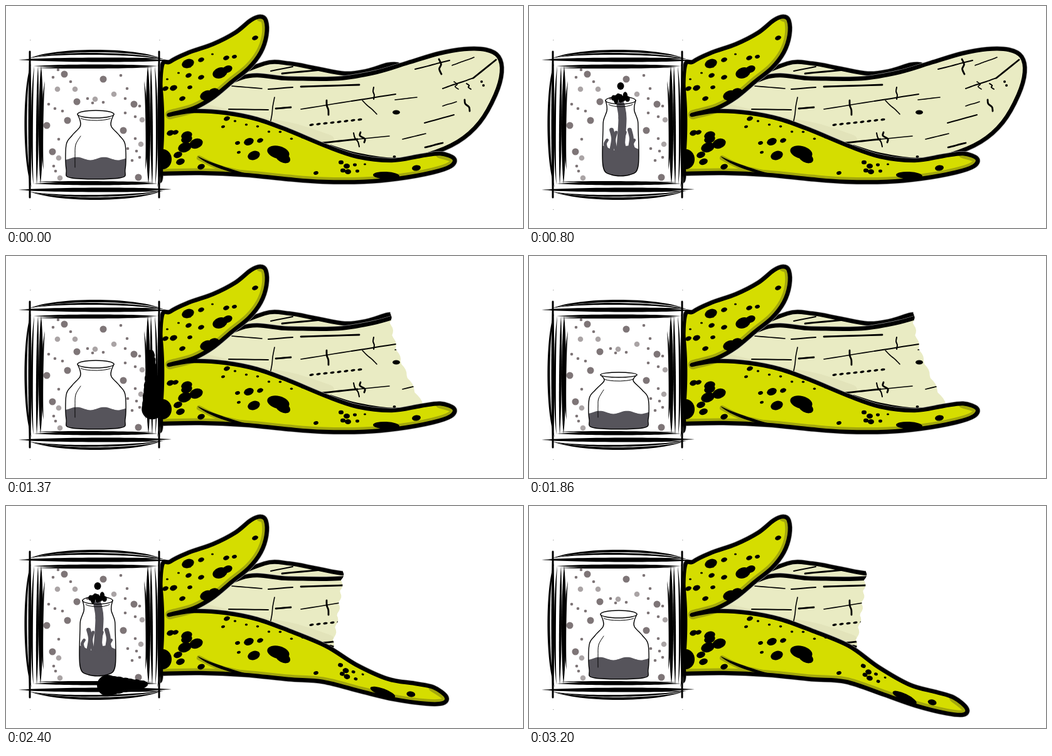
Animation of 824 by 355 pixels, one loop 3230 ms. Source, as an HTML page with a canvas:

```html
<!DOCTYPE html>
<html lang="en">
<head>
<meta charset="utf-8">
<title>Jar and banana</title>
<style>
html, body { margin: 0; width: 100%; height: 100%; overflow: hidden; background: #fff; }
canvas { display: block; }
</style>
</head>
<body>
<canvas id="stage" width="824" height="355"></canvas>
<script>
const ctx = document.getElementById('stage').getContext('2d');
const LOOP = 3230, BITE_1 = 1000, BITE_2 = 2130;
const INK = '#000', PEEL = '#d5dd00', PEEL_SHADE = '#a3a80c', FLESH = '#e9ebc3', LIQUID = '#56545b';

const clamp = (v, lo = 0, hi = 1) => Math.min(hi, Math.max(lo, v));
const range = n => [...Array(n).keys()];

// Linear interpolation through [time, value] pairs.
function keys(t, pairs) {
  const i = pairs.findIndex(([at]) => t < at);
  if (i < 0) return pairs[pairs.length - 1][1];
  if (i === 0) return pairs[0][1];
  const [t0, a] = pairs[i - 1], [t1, b] = pairs[i];
  return a + (b - a) * (t - t0) / (t1 - t0);
}

// Smooth curve through points; a doubled point makes a sharper corner.
function spline(points, closed = false) {
  const path = new Path2D(), n = points.length;
  const at = i => closed ? points[(i + n) % n] : points[clamp(i, 0, n - 1)];
  path.moveTo(...points[0]);
  for (let i = 0; i < (closed ? n : n - 1); i++) {
    const [p, a, b, q] = [at(i - 1), at(i), at(i + 1), at(i + 2)];
    path.bezierCurveTo(a[0] + (b[0] - p[0]) / 6, a[1] + (b[1] - p[1]) / 6,
      b[0] - (q[0] - a[0]) / 6, b[1] - (q[1] - a[1]) / 6, b[0], b[1]);
  }
  if (closed) path.closePath();
  return path;
}

function fill(path, color) { ctx.fillStyle = color; ctx.fill(path); }
function stroke(path, width, color = INK) {
  ctx.strokeStyle = color; ctx.lineWidth = width; ctx.stroke(path);
}
function oval(x, y, rx, ry = rx, turn = 0, color = INK) {
  ctx.fillStyle = color;
  ctx.beginPath();
  ctx.ellipse(x, y, rx, ry, turn, 0, 7);
  ctx.fill();
}
function clipped(path, draw) {
  ctx.save(); ctx.clip(path); draw(); ctx.restore();
}
// Brush stroke with pointed ends, bowed sideways.
function slash(x1, y1, x2, y2, width, bow = 0) {
  const len = Math.hypot(x2 - x1, y2 - y1), nx = -(y2 - y1) / len, ny = (x2 - x1) / len;
  const ctrl = (k, d) => [x1 + (x2 - x1) * k + nx * d, y1 + (y2 - y1) * k + ny * d];
  const out = bow * 1.33 + width * .66, back = bow * 1.33 - width * .66;
  ctx.fillStyle = INK;
  ctx.beginPath();
  ctx.moveTo(x1, y1);
  ctx.bezierCurveTo(...ctrl(.2, out), ...ctrl(.8, out), x2, y2);
  ctx.bezierCurveTo(...ctrl(.8, back), ...ctrl(.2, back), x1, y1);
  ctx.fill();
}

// ---- Fruit ----
const body = spline([[285,172], [375,115], [450,116], [530,116], [590,106], [640,91], [690,76], [730,69], [765,70],
  [785,81], [790,106], [780,142], [755,186], [720,217], [670,238], [620,246], [560,238], [510,223], [400,190]], true);
const strip = spline([[360,122], [412,92], [452,92], [495,100], [540,108], [575,104], [608,94], [620,96], [530,116]], true);
// Each crack runs between two points.
const cracks = [[422,104,457,97], [440,108,502,102], [360,128,408,132], [418,133,457,130], [470,129,563,126],
  [428,146,421,188], [355,165,418,166], [430,164,454,162], [470,165,551,152], [551,152,621,141], [511,151,514,174],
  [568,151,591,173], [586,130,586,149], [502,219,560,213], [560,213,611,208], [554,203,563,225], [565,202,571,218],
  [632,213,669,204], [652,101,707,87], [690,85,694,109], [711,95,746,82], [696,132,745,115], [745,115,781,86],
  [714,121,721,133], [734,124,741,133], [731,150,739,168], [696,160,718,153], [667,187,714,174], [668,226,696,219],
  [620,150,655,146]
].map(([x1, y1, x2, y2], i) => {
  const bow = 3 * Math.sin(i * 5);
  const mid = k => x1 + (x2 - x1) * k, midY = k => y1 + (y2 - y1) * k;
  const tall = Math.abs(y2 - y1) > Math.abs(x2 - x1) ? 1 : .2;
  return spline([[x1, y1], [mid(.35) + bow * tall, midY(.35)], [mid(.65) - bow * tall, midY(.65)], [x2, y2]]);
});

// Everything left of a ragged edge that follows a quadratic curve.
function biteMask([x0, y0], [cx, cy], [x1, y1]) {
  const mask = new Path2D('M0 0');
  for (const i of range(37)) {
    const k = i / 36, a = (1 - k) ** 2, b = 2 * k * (1 - k), c = k * k;
    const ragged = 4 * Math.abs(Math.sin(k * 22)) - 2;
    mask.lineTo(a * x0 + b * cx + c * x1 + ragged, i ? a * y0 + b * cy + c * y1 : 0);
  }
  mask.lineTo(x1, 355);
  mask.lineTo(0, 355);
  return mask;
}
const firstBite = biteMask([612,88], [613,155], [667,242]);
const secondBite = biteMask([537,102], [532,160], [519,234]);

function fruit() {
  for (const part of [strip, body]) {
    stroke(part, 8, '#999');
    fill(part, FLESH);
    stroke(part, 6.5);
  }
  clipped(body, () => stroke(spline([[300,160], [390,182], [460,196], [515,214]]), 16, '#e2e3ba'));
  cracks.forEach((c, i) => stroke(c, [2, 2.8, 1.6][i % 3]));
  for (const i of range(8)) oval(487 + i * 11, 190 - i * 1.2, 3.6, 1.8, -.2);
  oval(622, 170, 6, 3.5);
  oval(619, 241, 2.5, 2);
  oval(758, 121, 2);
  oval(761, 127, 2);
}

function drawFruit(t) {
  if (t < BITE_1) fruit();
  else clipped(t < BITE_2 ? firstBite : secondBite, fruit);
}

function drawCrumbs(t) {
  const first = t < BITE_2, age = t - (first ? BITE_1 : BITE_2);
  if (age < 0 || age > 180) return;
  const crumbs = first ? [[649,87,-.9], [677,148,-.3], [699,208,.05]] : [[586,116,-.5], [590,160,-.3], [597,209,-.25]];
  const shift = (age - (first ? 30 : 90)) * .3, long = 10 + age * .11;
  for (const [x, y, turn] of crumbs) oval(x + shift, y, long, 7.5, turn, FLESH);
}

// ---- Peel ----
const upperPeel = [[247,108], [262,89], [290,75], [330,61], [365,43], [390,23], [405,17], [414,23], [415,47],
  [406,74], [387,99], [360,121], [330,146], [300,163], [264,173], [264,173]];
const lowerPeel = [[300,168], [350,171], [400,181], [450,199], [510,224]];
const peelTip = [[560,241], [615,247], [660,240], [692,236], [714,244], [709,256], [680,266], [625,276], [570,281]];
const peelBase = [[505,281], [450,277], [380,270], [310,267], [247,268], [247,268]];
// Spots are [x, y, radius].
const spots = [[290,92,10], [341,107,12], [353,101,8], [311,86,5], [351,83,5], [364,81,4], [291,111,5], [311,114,5],
  [267,131,6], [293,130,4], [281,148,5], [254,132,5], [397,51,5], [320,143,11], [331,138,9], [363,122,4],
  [262,203,6], [270,202,5], [288,207,9], [288,213,9], [303,220,11], [285,226,11], [274,238,7], [278,249,7],
  [311,257,6], [352,180,5], [369,219,4], [387,217,8], [405,215,5], [395,239,10], [371,234,3], [346,193,3], [494,267,4]];
const tipSpots = [[534,250,4], [543,256,5], [545,265,5], [556,254,3], [537,263,4], [560,264,3], [572,253,2]];

function drawPeel(t) {
  const u = clamp((t - BITE_2) / 400), drop = u * (1.4 - .4 * u);
  const bend = ([x, y]) => {
    const d = Math.max(0, x - 520) * drop;
    return [x - .085 * d, y + .41 * d];
  };
  const tip = peelTip.map(bend);
  const outline = spline([...upperPeel, ...lowerPeel, ...tip, ...peelBase], true);
  stroke(outline, 8, '#999');
  fill(outline, PEEL);
  clipped(outline, () => {
    stroke(spline([...tip.slice(3), ...peelBase]), 15, PEEL_SHADE);
    stroke(spline(upperPeel.slice(6)), 15, PEEL_SHADE);
    stroke(spline([[308,243], [340,258], [392,270]]), 8, PEEL_SHADE);
    for (const [x, y, r] of spots) oval(x, y, r, r * .7, -.35);
    // Specks scattered around the larger spots.
    for (const i of range(7)) oval(365 + i * 18, 184 + 5 * i + 5 * Math.sin(i * 3), 2.2, 1.8);
    for (const i of range(5)) oval(257 + i * 18, 117 - i * 10, 2, 1.6);
    oval(250, 245, 14, 16);
    oval(434, 234, 18, 10, .25);
    oval(441, 242, 13, 8, .5);
    for (const [x, y, r] of tipSpots) oval(...bend([x, y]), r, r * .8, .3 * drop);
    oval(...bend([654, 259]), 7, 4.5, -.15 + .4 * drop);
    oval(...bend([606, 271]), 21, 6, .05 + .4 * drop);
  });
  stroke(outline, 6.5);
  slash(305, 240, 394, 270, 5, 5);
}

// ---- Box ----
const bigDots = [[93,109], [155,117], [113,153], [98,183], [65,191], [204,157], [187,199], [74,233], [211,274]];
const paleDots = [[172,141], [82,133], [110,133], [142,149], [217,182], [215,221], [84,243], [86,275]];
const smallDots = [[83,102], [75,114], [193,132], [103,121], [183,111], [130,148], [138,155], [155,154], [68,157],
  [78,164], [90,168], [190,148], [213,160], [206,177], [190,171], [206,212], [213,242], [201,247], [194,228],
  [84,213], [79,264], [76,256], [208,232]];

function drawBoxInside() {
  ctx.fillStyle = '#fff';
  ctx.fillRect(36, 84, 210, 212);
  for (const [x, y] of bigDots) oval(x, y, 5.5, 5.5, 0, '#7e7577');
  for (const [x, y] of paleDots) oval(x, y, 4.3, 4.3, 0, '#aaa4a5');
  for (const [x, y] of smallDots) oval(x, y, 2.3, 2.3, 0, '#7e7577');
}

function drawFrame() {
  for (const [y, s] of [[86, 1], [294, -1]]) {
    slash(20, y, 264, y + s, 6);
    slash(30, y - s, 250, y - s * 2, 4);
    slash(36, y - s * 2, 248, y - s * 2, 4, -s * 12);
    slash(40, y - s * 3, 255, y, 3, -s * 8);
    slash(44, y + s * 10, 242, y + s * 10, 5);
    slash(50, y + s * 13, 236, y + s * 12, 3);
  }
  for (const [x, s] of [[38, 1], [244, -1]]) {
    slash(x, 70, x, 308, 5);
    stroke(new Path2D(`M${x} 73V306`), 3);
    slash(x + s * 2, 92, x + s * 3, 290, 4, s * 9);
    slash(x + s * 7, 96, x + s * 6, 286, 3, s * 3);
    slash(x + s * 13, 96, x + s * 11, 286, 4);
    slash(x + s * 18, 96, x + s * 17, 284, 7);
    slash(x + s * 24, 120, x + s * 22, 262, 3, s * 3);
    ctx.fillStyle = '#aaa';
    ctx.fillRect(x, 54, 1.5, 1);
    ctx.fillRect(x, 325, 1.5, 1);
  }
}

// ---- Jar ----
// shape: half width and y of rim, neck, belly and base; ink: [x, y, spread, height] of the splash.
const poses = {
  rest: { shape: [29,173, 25,193, 47,222, 38,275], level: 244 },
  squash: { shape: [29,190, 24,201, 47,228, 38,275], level: 250 },
  splash: { shape: [29,190, 24,201, 47,228, 38,275], level: 238, fingers: 9, reach: 38, ink: [146,189,20,4] },
  stretch: { cx: 146, shape: [24,151, 22,168, 28,196, 14,270], level: 227, fingers: 7, reach: 48,
    ink: [146,147,11,7], bead: [146,128,5.5,6] },
  jump: { cx: 145, shape: [29,128, 26,147, 47,176, 38,231], level: 182, fingers: 7, reach: 28, holes: 10,
    ink: [150,112,13,12], bead: [124,107,7,8] }
};
const beats = [[0,'rest'], [200,'squash'], [400,'stretch'], [600,'jump'], [800,'stretch'], [1000,'splash'], [1200,'rest'],
  [1760,'squash'], [1960,'stretch'], [2130,'jump'], [2360,'stretch'], [2530,'splash'], [2700,'rest']];

function drawLiquid({ cx = 143, shape, level, fingers = 0, reach, holes = 0 }) {
  const belly = shape[4], neckY = shape[3];
  const pool = spline(range(13).map(i =>
    [cx - 52 + i * 8.7, level + (fingers ? 4 : 2.5) * Math.sin(i * 1.25 + 1.6)]));
  pool.lineTo(210, 300);
  pool.lineTo(80, 300);
  fill(pool, LIQUID);
  for (const i of range(fingers)) {
    const k = (i + .5) / fingers * 2 - 1, x = cx + k * belly * .9, sway = i % 2 ? 3 : -3;
    const top = level - reach * (1 - .7 * Math.abs(k)) * (i % 2 ? 1 : .65);
    stroke(spline([[x, top], [x + sway, (top + level) / 2], [x, level + 4]]), i % 2 ? 7 : 5, LIQUID);
  }
  if (fingers) stroke(spline([[cx, neckY - 10], [cx + 3, neckY + 12], [cx, level]]), 13, LIQUID);
  for (const i of range(holes)) {
    const x = cx - 36 + i * 7;
    oval(x, level + 12 + 11 * Math.sin(i * 1.9), i % 2 ? 4 : 7, i % 2 ? 8 : 4, .3, '#fff');
  }
}

function drawJar(t) {
  const name = beats.filter(([at]) => at <= t).pop()[1], pose = poses[name];
  const { cx = 143, shape, ink, bead } = pose;
  const [rim, rimY, neck, neckY, belly, bellyY, base, baseY] = shape;
  const profile = [[rim, rimY], [neck, rimY + (neckY - rimY) * .5], [neck, neckY],
    [(neck + belly) / 2 + 2, (neckY + bellyY) / 2], [belly, bellyY], [belly, baseY - 14], [base, baseY]];
  const left = profile.map(([w, y]) => [cx - w, y]);
  const right = profile.map(([w, y]) => [cx + w, y]).reverse();
  const glass = spline([...left, ...right], true);
  ctx.save();
  if (name === 'jump') {
    ctx.translate(cx, bellyY); ctx.rotate(-.035); ctx.translate(-cx, -bellyY);
  }
  fill(glass, '#fff');
  clipped(glass, () => drawLiquid(pose));
  stroke(spline([...left, ...right]), 1.4);
  const mouth = new Path2D(), lip = new Path2D();
  mouth.ellipse(cx, rimY, rim, rimY > 180 ? 4 : 6, 0, 0, 7);
  lip.ellipse(cx, rimY + 5, rim - 4, 5, 0, .3, 2.8);
  if (!ink) fill(mouth, '#fff');
  stroke(mouth, 1.3);
  stroke(lip, 1);
  if (belly > 40 && !pose.holes) stroke(spline([[119, bellyY - 14], [111, bellyY], [110, 240], [110, 258]]), 1);
  if (ink) {
    const [x, y, spread, tall] = ink;
    for (const i of range(7)) {
      oval(x + (i / 3 - 1) * spread, y + tall * .4 * Math.sin(i * 2.2), 3.8, tall * (i % 2 ? 1 : .65));
    }
  }
  if (bead) oval(...bead);
  ctx.restore();
}

// ---- Ink creature: a ball that streaks along one side of the frame ----
function inkTrail(head, tail, wobble) {
  const length = Math.hypot(head[0] - tail[0], head[1] - tail[1]), n = Math.ceil(length / 4) + 1;
  for (const i of range(n + 1)) {
    const k = i / n, r = length > 30 ? 5 + 11 * k : 15;
    oval(tail[0] + (head[0] - tail[0]) * k, tail[1] + (head[1] - tail[1]) * k, r + Math.sin(i * 2.4 + wobble));
  }
}

function drawFace(x, y) {
  fill(new Path2D(`M${x - 9} ${y - 7}l7 4l-5 2zM${x + 9} ${y - 8}l-6 5l5 1z
    M${x - 11} ${y + 2}l4 3l3-1l2 3l3-2l3 2l3-3l4-3q-2 11-10 11q-9-1-12-10z`), '#fff');
  stroke(new Path2D(`M${x - 3} ${y + 3}v10M${x + 3} ${y + 3}v10`), 1.5);
}

function drawCreature(t) {
  if (t >= BITE_1 && t < 1860) {
    const age = t - BITE_1;
    const head = keys(age, [[0,104], [60,112], [270,205], [470,284]]);
    const tail = keys(age, [[60,104], [270,125], [470,185], [600,225], [760,284]]);
    inkTrail([233, head], [231, tail], age / 60);
    if (age < 90) {
      for (const a of range(10)) oval(231 + 15 * Math.cos(a * .63), 108 + 14 * Math.sin(a * .63), 5);
      drawFace(231, 107);
    }
  } else if (t >= BITE_2 && t < 3200) {
    const age = t - BITE_2;
    const head = keys(age, [[0,226], [90,216], [270,162], [400,92], [570,52]]);
    const tail = keys(age, [[0,229], [270,222], [400,200], [570,195], [900,55]]);
    inkTrail([head, 287], [tail, age < 120 ? 279 : 285], age / 60);
    if (age < 130) {
      oval(207, 267, 4, 5);
      oval(234, 268, 5, 6);
      stroke(new Path2D('M212 282l4 3M216 291l5 3'), 1, '#fff');
    }
  }
}

function render(t) {
  ctx.fillStyle = '#fff';
  ctx.fillRect(0, 0, 824, 355);
  ctx.lineCap = ctx.lineJoin = 'round';
  drawFruit(t);
  drawCrumbs(t);
  drawPeel(t);
  drawBoxInside();
  drawJar(t);
  drawFrame();
  drawCreature(t);
}

let start;
function tick(now) {
  start ??= now;
  render((now - start) % LOOP);
  requestAnimationFrame(tick);
}
render(0);
requestAnimationFrame(tick);
</script>
</body>
</html>
```
